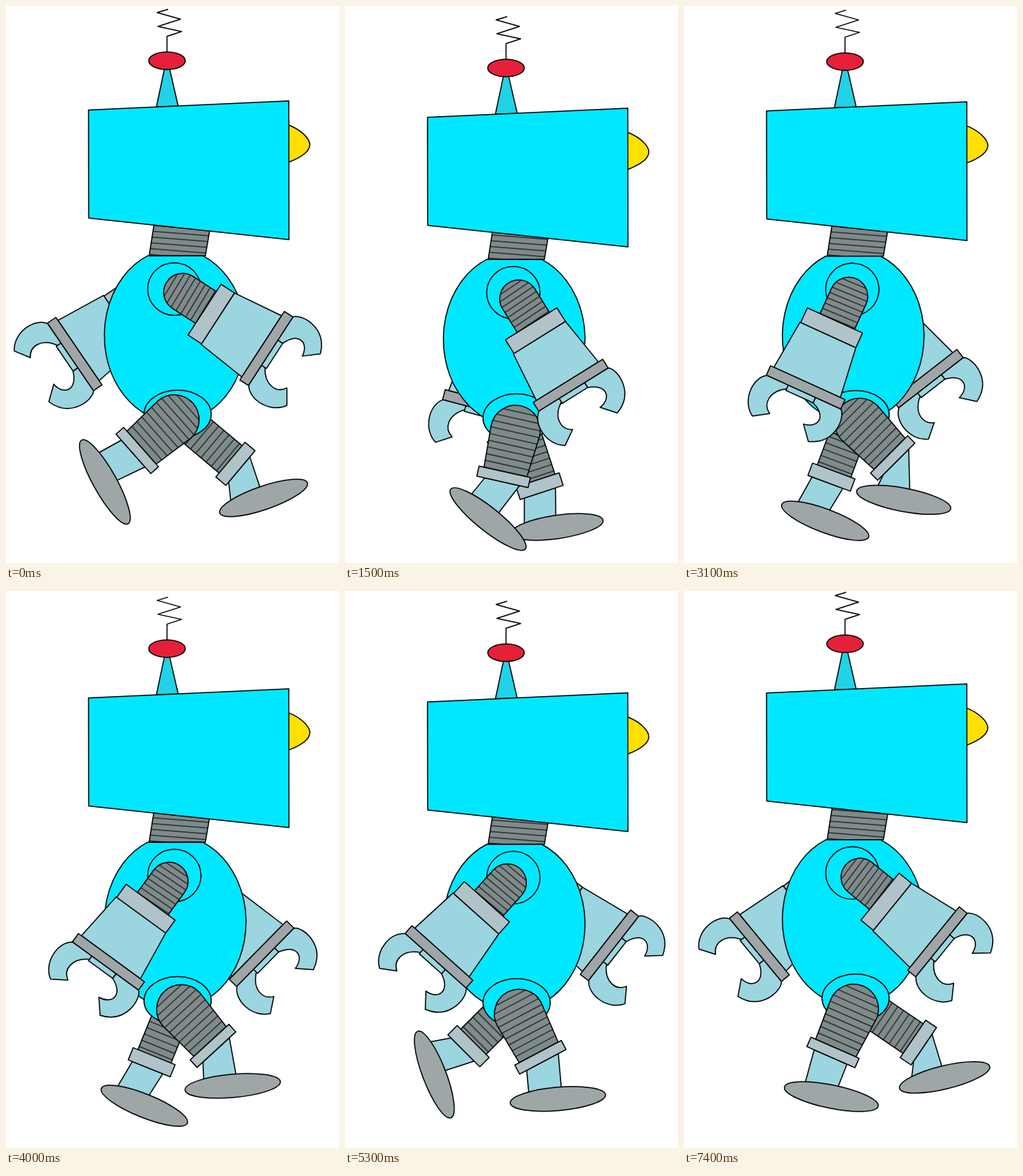
Write an HTML page with a canvas that moves like this. It is 456 by 763 pixels and loops after 7.5 s.

```html
<!DOCTYPE html>
<html lang="en">
<head>
<meta charset="utf-8">
<title>Walking robot</title>
<style>
html, body { margin: 0; width: 100%; height: 100%; overflow: hidden; background: #fff; }
canvas { display: block; width: 456px; height: 763px; }
</style>
</head>
<body>
<canvas id="stage" width="456" height="763"></canvas>
<script>
const ctx = document.getElementById('stage').getContext('2d');
const LOOP = 7500, STEP = 100, RAD = Math.PI / 180;
const CYAN = '#00e8ff', LIMB = '#9bd5df', RIBBED = '#7f8a8b', CUFF = '#b0c3c8', STEEL = '#9fa6a8';

// Key poses are [step, value, bend]; bend 1 eases in, -1 eases out, 0 is linear.
const bob = [[0, 0, -.9], [12, 11, .4], [32, .4, 0], [54, 10, -1], [75, -2.7]];

const near = {
  shoulder: [231, 386], armShift: [0, 0],
  arm: [[0, 57, .71], [32, -29, -.8], [54, -42, .3], [75, 57]],
  hip: [237, 565], drop: 6,
  thigh: [[0, -48.5, .4], [31, 45, 1.05], [75, -27]],
  tilt: [[0, 61, .2], [39, -5, 0], [63, -5, 0], [75, 13]],
  shape: new Path2D('M-33 68L-36 7A34 34 0 0 1 32 7L27 68Z'),
  cuff: [-40, 66, 72, 14], shin: [-29, 20], knee: [-4, 88],
  ankle: [-13, -45], heel: [-39, 6], foot: 65.5
};
const far = {
  shoulder: [229.5, 381.5], armShift: [5, 15],
  arm: [[0, -55.7, .2], [32, 41.5, 0], [54, 52.5, .25], [75, -57]],
  hip: [245.5, 557.3], drop: 0,
  thigh: [[0, 50, .13], [32, -23, 0], [40, -22, 0], [53, -45, -1], [75, 56]],
  tilt: [[0, -19, .85], [32, 23, 0], [40, 22, 0], [53, 69, -.4], [75, -16]],
  shape: new Path2D('M-34 90L-34 0L15 0L15 90Z'),
  cuff: [-41, 89, 62, 18], shin: [-35, 10], knee: [-10, 114],
  ankle: [-13, -43], heel: [-44, 0], foot: 63.5
};

const leftClaw = new Path2D('M-57 158C-74 168 -74 204 -52 217L-32 204C-46 196 -46 176 -24 163L-24 158Z');
const rightClaw = new Path2D('M54 158C64 165 68 205 32 217L16 198C36 196 42 176 16 166L16 158Z');
const armStub = new Path2D('M-26 52L-26 13A26 26 0 0 1 26 13L26 52Z');
const neck = new Path2D('M204 292L281 296L273 343L196 343Z');
const torso = new Path2D('M194 343L269.4 343A97 118.5 0 1 1 194 343Z');
const nose = new Path2D('M387 163C405 170 416 182 416 190C416 199 405 207 387 214Z');

function at(keys, s) {
  let i = 0;
  while (s >= keys[i + 1][0]) i++;
  const [s0, v0, bend] = keys[i], [s1, v1] = keys[i + 1];
  const k = (s - s0) / (s1 - s0);
  return v0 + (v1 - v0) * (k - bend * k * (1 - k));
}

// Places a local point in a frame turned clockwise by deg.
function place([x, y], deg, [px, py]) {
  const c = Math.cos(deg * RAD), n = Math.sin(deg * RAD);
  return [x + px * c - py * n, y + px * n + py * c];
}

function inFrame([x, y], deg, paintIn) {
  ctx.save();
  ctx.translate(x, y);
  ctx.rotate(deg * RAD);
  paintIn();
  ctx.restore();
}

function paint(path, fill) {
  ctx.fillStyle = fill;
  ctx.fill(path);
  ctx.stroke(path);
}

function poly(fill, ...points) {
  const p = new Path2D();
  for (const [x, y] of points) p.lineTo(x, y);
  p.closePath();
  paint(p, fill);
}

function box(fill, x, y, w, h) {
  const p = new Path2D();
  p.rect(x, y, w, h);
  paint(p, fill);
}

function oval(fill, x, y, rx, ry) {
  const p = new Path2D();
  p.ellipse(x, y, rx, ry, 0, 0, Math.PI * 2);
  paint(p, fill);
}

function ribbed(path, x0, x1, y0, y1, gap, slant = 0) {
  ctx.fillStyle = RIBBED;
  ctx.fill(path);
  ctx.save();
  ctx.clip(path);
  ctx.strokeStyle = '#2b3132';
  ctx.beginPath();
  for (let y = y0; y < y1; y += gap) {
    ctx.moveTo(x0, y);
    ctx.lineTo(x1, y + slant);
  }
  ctx.stroke();
  ctx.restore();
  ctx.stroke(path);
}

function drawArm(side, s, sink) {
  const [x, y] = side.shoulder;
  inFrame([x, y + sink], -at(side.arm, s), () => {
    ctx.translate(...side.armShift);
    ribbed(armStub, -28, 28, -5, 52, 8, -2);
    poly(LIMB, [-46, 73], [38, 73], [47, 144], [-53, 144]);
    box(CUFF, -45, 51, 83, 22);
    paint(leftClaw, LIMB);
    paint(rightClaw, LIMB);
    box(LIMB, -25, 158, 41, 8);
    box(STEEL, -58, 144, 112, 14);
  });
}

function drawLeg(side, s, sink) {
  const thigh = -at(side.thigh, s), tilt = at(side.tilt, s);
  const hip = [side.hip[0], side.hip[1] + sink + side.drop * Math.cos(2 * thigh * RAD)];
  const knee = place(hip, thigh, side.knee);
  const foot = place(knee, tilt, side.ankle.map(v => -v));
  const [left, right] = side.shin, [heel, toe] = side.heel;
  const top = side.cuff[1] + side.cuff[3];
  poly(LIMB,
    place(hip, thigh, [left, top]), place(hip, thigh, [right, top]),
    place(foot, tilt, [toe, -13]), place(foot, tilt, [heel, -10]));
  inFrame(foot, tilt, () => oval(STEEL, 0, 0, side.foot, 16));
  inFrame(hip, thigh, () => {
    ribbed(side.shape, -40, 36, -18, side.cuff[1], 9.3);
    box(CUFF, ...side.cuff);
  });
}

function drawBody() {
  ribbed(neck, 194, 282, 301, 343, 8, 7);
  paint(torso, CYAN);
  oval(CYAN, 235, 560, 46, 33);
  oval(CYAN, 230.5, 388.5, 36.5, 36);
}

function drawHead() {
  paint(nose, '#ffe000');
  poly('#22d2e6', [217, 86], [224, 86], [236, 138], [206, 138]);
  poly(CYAN, [113, 142.5], [387.3, 130], [387.5, 320], [113.3, 290.5]);
  ctx.stroke(new Path2D('M222 4.5L207 9L239 18L208 28L240.5 35L220.5 41.5V64'));
  oval('#e62039', 220.5, 75, 25, 12);
}

function draw(s) {
  const lift = at(bob, s), sink = lift * .5 - .8;
  ctx.fillStyle = '#fff';
  ctx.fillRect(0, 0, 456, 763);
  ctx.strokeStyle = '#000';
  ctx.lineWidth = 1.5;
  ctx.lineJoin = 'round';

  drawArm(far, s, sink);
  drawLeg(far, s, sink);
  inFrame([0, sink], 0, drawBody);
  drawLeg(near, s, sink);
  drawArm(near, s, sink);
  inFrame([0, lift], 0, drawHead);
}

const start = performance.now();
function tick() {
  const t = (performance.now() - start) % LOOP;
  draw(Math.floor(t / STEP));
  requestAnimationFrame(tick);
}
tick();
</script>
</body>
</html>
```
